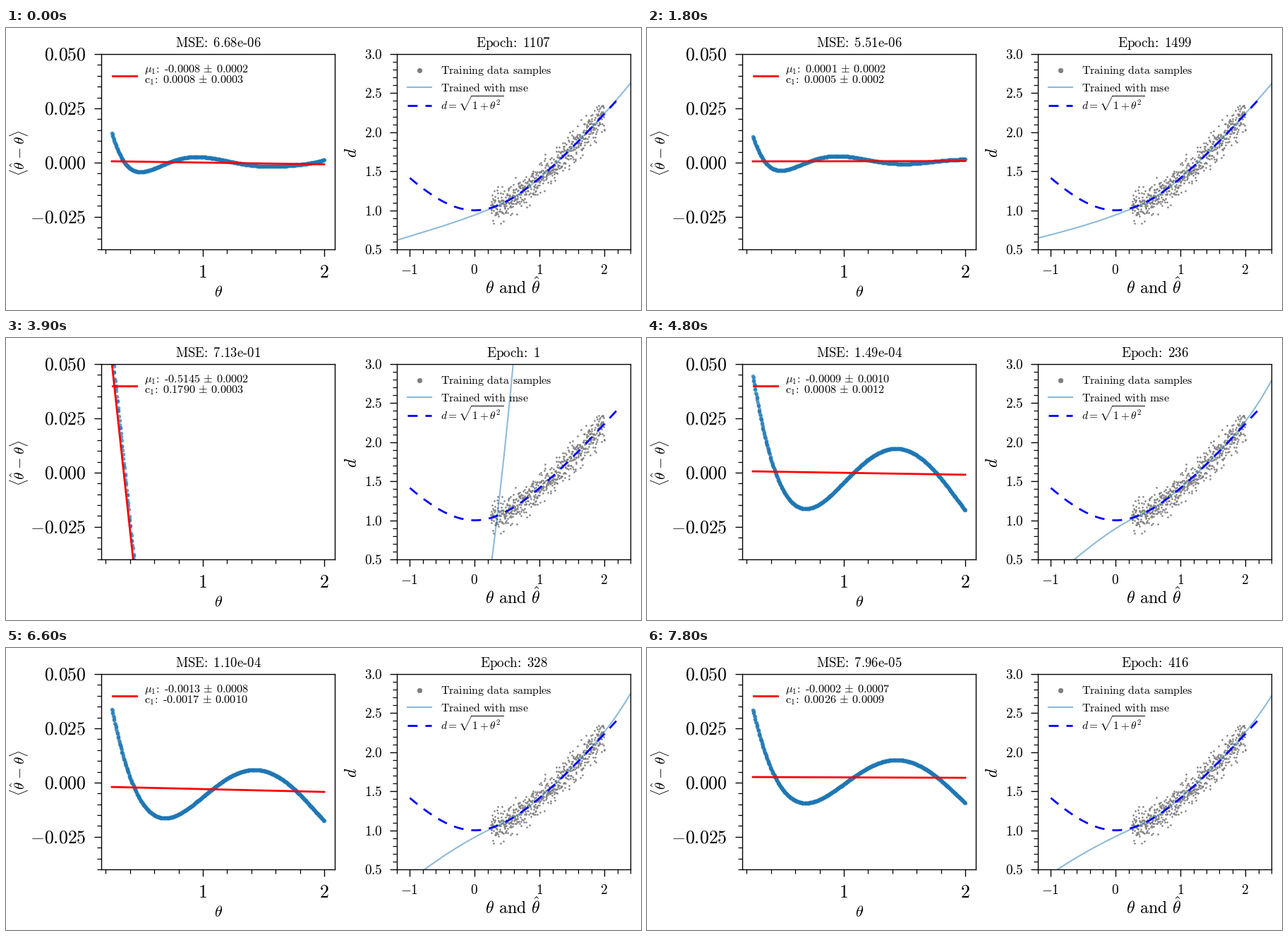
Recreate the animation shown at these times as a matplotlib script. Size 900 by 400 pixels, loop 8 s.

```python
import numpy as np
import matplotlib.pyplot as plt
from matplotlib.animation import FuncAnimation
from numpy.polynomial.legendre import legval

plt.rcParams["mathtext.fontset"] = "cm"

W, H = 900, 400
PANEL_W, PANEL_H, BASE = 331, 277, 314
STEP_MS, TICK_MS, LOOP_MS = 300, 100, 8000
RESTART = 13  # step at which training starts again

# step: epoch, mse, slope, offset, trained curve at the left edge
LATE = {0: (1107, 6.68e-6, -.0008, .0008, .617),
        4: (1363, 6.12e-6, .0002, .0001, .635),
        9: (1702, 4.71e-6, -.0001, .0012, .658)}
EARLY = {16: (236, 1.49e-4, -.0009, .0008, .092),
         22: (328, 1.10e-4, -.0013, -.0017, .223),
         26: (416, 7.96e-5, -.0002, .0026, .323)}

rng = np.random.default_rng(4)
COUNT = 580
theta = np.linspace(.25, 2, COUNT)
theta = np.clip(theta + rng.uniform(-.002, .002, COUNT), .25, 2)
unit = (theta - 1.125) / .875
wide = np.linspace(-1.2, 2.4, 200)


def blend(keys, step):
    """Linear between keys (mse in log), continued past the ends."""
    steps = sorted(keys)
    i = int(np.clip(np.searchsorted(steps, step) - 1, 0, len(steps) - 2))
    a, b = (np.array(keys[s], float) for s in steps[i:i + 2])
    a[1], b[1] = np.log([a[1], b[1]])
    row = a + (b - a) * (step - steps[i]) / (steps[i + 1] - steps[i])
    row[1] = np.exp(row[1])
    return row


def ideal(x):
    return np.sqrt(1 + x**2)


def trained_curve(left):
    """Follows the ideal curve inside the data and drifts off outside."""
    join, start = .4, -1.2
    span = join - start
    u = np.clip((wide - start) / span, 0, 1)
    s = u * u * (3 - 2 * u)
    slope_in, slope_out = .75 - 1.3 * left**2, join / ideal(join)
    tail = (left * (1 - s) + ideal(join) * s
            + span * u * (1 - u) * (slope_in * (1 - u) - slope_out * u))
    excess = .31 * (.7 - left) * np.clip((wide - 1.5) / .9, 0, None)**3
    return np.where(wide < join, tail, ideal(wide) + excess)


def state(step):
    """Epoch, mse, slope, offset, residual at theta, trained curve (x, y)."""
    if step == RESTART:
        s = np.linspace(0, 1, 60)
        x = .265 + .327 * s + .05 * s * (1 - s)
        return 1, .713, -.5145, .1790, legval(unit, [0, 0, .0065]), x, .5 + 2.5 * s
    late = step < RESTART
    epoch, mse, slope, offset, edge = blend(LATE if late else EARLY, step)
    if late:
        wave = legval(unit, [0, 0, 0, -.1, 1, -.85 - .03 * step, .3])
    else:
        wave = legval(unit, [0, 0, .1, -1, .36])
    # the wave carries what the straight line leaves of the mse
    rest = mse - np.mean((offset + slope * theta)**2)
    wave *= np.sqrt(rest / np.mean(wave**2))
    return epoch, mse, slope, offset, wave, wide, trained_curve(edge)


fig = plt.figure(figsize=(W / 100, H / 100), dpi=100, facecolor="white")


def put(x, y, body, size, ha="left", **kw):
    return fig.text(x / W, 1 - y / H, f"${body}$", fontsize=size, ha=ha,
                    va="baseline", **kw)


def text(s):
    return rf"\text{{{s}}}"


def labelled(name, value):
    return text(name + ":") + r"\hspace{0.5}" + text(value)


def stat(symbol, value, error):
    value = round(value, 4) + 0.0
    return (symbol + "_1" + labelled("", f"{value:.4f} ")
            + r"{\pm}" + text(f" {error:.4f}"))


def panel(x, xlim, ylim, xminor, yminor, xmajor, ymajor):
    ax = fig.add_axes([x / W, 1 - BASE / H, PANEL_W / W, PANEL_H / H])
    ax.set(xlim=xlim, ylim=ylim)
    ax.set_xticks(xmajor)
    ax.set_yticks(ymajor)
    ax.set_xticks(xminor, minor=True)
    ax.set_yticks(yminor, minor=True)
    ax.tick_params(length=7, width=1, labelleft=False, labelbottom=False)
    ax.tick_params(which="minor", length=4, width=.9)
    for spine in ax.spines.values():
        spine.set_linewidth(1)
    return ax


def tick_text(value, form):
    return ("-" if value < 0 else "") + text(format(abs(value), form))


def tick_labels(ax, x0, size, drop, bottom, right, form):
    (xa, xb), (ya, yb) = ax.get_xlim(), ax.get_ylim()
    for v in ax.get_xticks():
        put(x0 + PANEL_W * (v - xa) / (xb - xa) - .5, bottom,
            tick_text(v, ".0f"), size, "center")
    for v in ax.get_yticks():
        put(right, BASE - PANEL_H * (v - ya) / (yb - ya) + drop,
            tick_text(v, form), size, "right")


left = panel(135, (.1625, 2.0875), (-.04, .05), np.arange(1, 11) * .2,
             np.arange(-8, 11) * .005, [1, 2], [-.025, 0, .025, .05])
right = panel(554, (-1.2, 2.4), (.5, 3), np.arange(-6, 13) * .2,
              np.arange(5, 31) * .1, [-1, 0, 1, 2], np.arange(1, 7) * .5)
tick_labels(left, 135, 18.6, 9, 354.5, 113.5, ".3f")
tick_labels(right, 554, 13.9, 7, 349, 534, ".1f")

put(301, 381, r"\theta", 16, "center")
put(718.5, 377, r"\theta" + text(" and ") + r"\hat{\theta}", 17.2, "center")
put(27, 177, r"\langle\hat{\theta}\hspace{0.05}-\hspace{0.05}\theta\rangle",
    15.2, "center", rotation=90, rotation_mode="anchor")
put(497, 176.5, "d", 17, "center", rotation=90, rotation_mode="anchor")

dot_style = dict(ls="", marker="o", mew=0)
fit_style = dict(color="red", lw=2, solid_capstyle="projecting")
net_style = dict(color="tab:blue", alpha=.5, lw=1.5)
true_style = dict(color="blue", lw=2, ls=(0, (5, 4)))

dots, = left.plot([], [], color="tab:blue", alpha=.7, ms=4, **dot_style)
fit, = left.plot([], [], **fit_style)

noise = np.clip(rng.normal(0, .095, COUNT), -.24, .24)
right.plot(theta, np.minimum(ideal(theta) + noise, 2.345), color="gray",
           ms=1.9, **dot_style)
net, = right.plot([], [], **net_style)
span = np.linspace(-1, 2.2, 200)
right.plot(span, ideal(span), **true_style)


def legend_line(x0, x1, y, **style):
    fig.add_artist(plt.Line2D([x0 / W, x1 / W], [1 - y / H] * 2, **style))


legend_line(150.5, 184.5, 68, **fit_style)
legend_line(586, 586, 59.5, color="gray", ms=5, **dot_style)
legend_line(568.5, 603, 84, **net_style)
legend_line(568.5, 603, 110, **true_style)
put(616, 64.5, text("Training data samples"), 11.5)
put(616, 89.5, text("Trained with mse"), 11.5)
put(616, 115.5, r"d = \sqrt{1 + \theta^2}", 11.1)

mse_title = put(300.5, 27, "0", 13.5, "center")
epoch_title = put(719.5, 27, "0", 13.8, "center")
slope_text = put(196.5, 63, "0", 11.7)
offset_text = put(196.5, 78.5, "0", 11.7)


def update(frame):
    epoch, mse, slope, offset, wave, x, y = state(frame * TICK_MS // STEP_MS)
    slope_err = np.std(wave) / (np.std(theta) * np.sqrt(COUNT))
    offset_err = slope_err * np.sqrt(np.mean(theta**2))
    ends = np.array([.25, 2])
    dots.set_data(theta, offset + slope * theta + wave)
    fit.set_data(ends, offset + slope * ends)
    net.set_data(x, y)
    mse_title.set_text(f"${labelled('MSE', f'{mse:.2e}')}$")
    epoch_title.set_text(f"${labelled('Epoch', f'{epoch:.0f}')}$")
    slope_text.set_text("$" + stat(r"\mu", slope, slope_err) + "$")
    offset_text.set_text("$" + stat(r"\mathrm{c}", offset, offset_err) + "$")
    return dots, fit, net, mse_title, epoch_title, slope_text, offset_text


update(0)
anim = FuncAnimation(fig, update, frames=LOOP_MS // TICK_MS, interval=TICK_MS,
                     repeat=True, repeat_delay=0)
plt.show()
```
